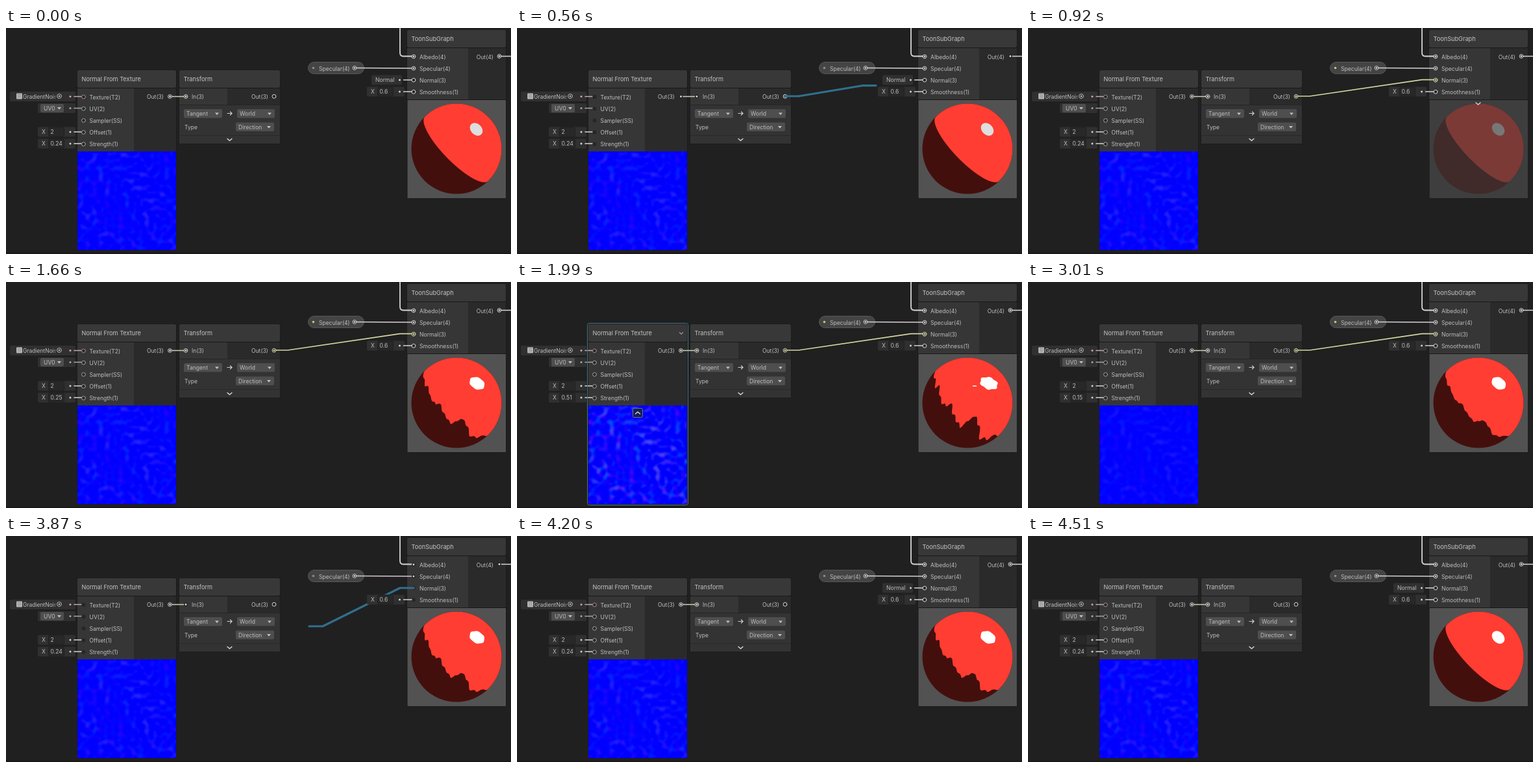
These frames come from a looping animation (778 by 348 pixels, 4610 ms). An HTML page with a canvas:

```html
<!DOCTYPE html>
<html lang="en">
<head>
<meta charset="utf-8">
<title>Shader graph</title>
<style>
html, body { margin: 0; width: 100%; height: 100%; overflow: hidden; background: #202020; }
canvas { display: block; }
</style>
</head>
<body>
<canvas id="stage" width="778" height="348"></canvas>
<script>
const ctx = document.getElementById('stage').getContext('2d');
const LOOP = 4610;
const WHITE = '#d6d5d6', YELLOW = '#d3d5a2', BLUE = '#326f8f', PINK = '#c4a9b4', DARK = '#262626';

const during = (t, from, to) => t >= from && t < to;
const mix = (a, b, k) => a + (b - a) * k;
const ease = k => k * k * (3 - 2 * k);

// Value at x on a list of [x, value] points
function sample(points, x, curve = k => k) {
  if (x <= points[0][0]) return points[0][1];
  for (let i = 1; i < points.length; i++) {
    const [x0, a] = points[i - 1], [x1, b] = points[i];
    if (x <= x1) return mix(a, b, curve((x - x0) / (x1 - x0)));
  }
  return points[points.length - 1][1];
}

// Strength scrubbed by the mouse, with short rests
const STRENGTH = [[1650, .24], [1990, .51], [2040, .54], [2170, .3], [2220, .05], [2270, -.12],
  [2499, -.12], [2500, -.18], [2680, -.08], [2829, -.08], [2830, 0], [3010, .15], [3220, .23],
  [3369, .23], [3370, .24]];

function rect(x, y, w, h, fill, r = 0, stroke) {
  ctx.beginPath();
  ctx.roundRect(x, y, w, h, r);
  if (fill) { ctx.fillStyle = fill; ctx.fill(); }
  if (stroke) { ctx.strokeStyle = stroke; ctx.lineWidth = 1; ctx.stroke(); }
}

function disc(x, y, r, fill) {
  ctx.beginPath();
  ctx.arc(x, y, r, 0, 7);
  ctx.fillStyle = fill;
  ctx.fill();
}

function ring(x, y, r, color) {
  ctx.beginPath();
  ctx.arc(x, y, r, 0, 7);
  ctx.strokeStyle = color;
  ctx.lineWidth = 1;
  ctx.stroke();
}

function line(points, color, width = 1.5) {
  ctx.beginPath();
  points.forEach(([x, y]) => ctx.lineTo(x, y));
  ctx.strokeStyle = color;
  ctx.lineWidth = width;
  ctx.lineJoin = ctx.lineCap = 'round';
  ctx.stroke();
}

function text(str, x, y, size = 8.6, color = '#bebebe', align = 'left') {
  ctx.font = `${size}px Inter, sans-serif`;
  ctx.textAlign = align;
  ctx.textBaseline = 'alphabetic';
  ctx.fillStyle = color;
  ctx.fillText(str, x, y);
}

function clipped(x, y, w, h, draw) {
  ctx.save();
  ctx.beginPath();
  ctx.rect(x, y, w, h);
  ctx.clip();
  draw();
  ctx.restore();
}

function port(x, y, color, filled, dim) {
  disc(x, y, 2.9, DARK);
  if (!dim) ring(x, y, 2.9, color);
  if (filled) disc(x, y, 1.4, color);
}

function chevron(x, y, color, up = 1, w = 3.5) {
  line([[x - w, y - w * .45 * up], [x, y + w * .45 * up], [x + w, y - w * .45 * up]], color, 1.3);
}

function caret(x, y) {
  ctx.beginPath();
  ctx.moveTo(x - 3, y - 1.5);
  ctx.lineTo(x + 3, y - 1.5);
  ctx.lineTo(x, y + 2);
  ctx.fillStyle = '#c4c4c4';
  ctx.fill();
}

function dropdown(label, x, y, w) {
  rect(x, y, w, 13.5, '#4e4e4e', 2);
  text(label, x + 4, y + 10);
  caret(x + w - 8, y + 7);
}

function node(title, x, y, w, h, split, bodyH) {
  rect(x - .5, y - .5, w + 1, h + 1, '#181818', 2);
  rect(x, y, w, 27, '#383838', 2);
  rect(x, y + 28, split - x, bodyH, '#363636');
  rect(split, y + 28, x + w - split, bodyH, '#2a2a2a');
  text(title, x + 6.5, y + 17, 9.2, '#c4c4c4');
}

const hover = (x, y, w, h) => rect(x - 1.5, y - 1.5, w + 3, h + 3, null, 3, '#44738a');

function wire(x0, y0, x1, y1, color, width) {
  const stub = Math.min(21, Math.abs(x1 - x0) / 2);
  line([[x0, y0], [x0 + stub, y0], [x1 - stub, y1], [x1, y1]], color, width);
}

function fieldBox(x, y, w, dotX, portX, color) {
  rect(x, y, w, 15, '#303030', 2);
  line([[dotX + 6, y + 7.5], [portX - 3, y + 7.5]], color);
  disc(dotX, y + 7.5, 1.5, color);
}

function numberField(x, y, value, dotX, portX) {
  fieldBox(x, y, 58, dotX, portX, WHITE);
  rect(x + 16.5, y + .5, 24, 14, '#282828', 2, '#202020');
  text('X', x + 6, y + 10.8);
  clipped(x + 17, y, 22.5, 15, () => text(value, x + 19.5, y + 10.8));
}

// Gradient noise, and the slopes a normal map takes from it
function gradient(x, y) {
  x %= 289; y %= 289;
  let h = ((34 * x + 1) * x) % 289 + y;
  h = ((34 * h + 1) * h) % 289;
  h = (h / 41 % 1) * 2 - 1;
  const gx = h - Math.floor(h + .5), gy = Math.abs(h) - .5, len = Math.hypot(gx, gy);
  return [gx / len, gy / len];
}

function noise(x, y) {
  const ix = Math.floor(x), iy = Math.floor(y), fx = x - ix, fy = y - iy;
  const corner = (cx, cy) => {
    const [gx, gy] = gradient(ix + cx, iy + cy);
    return gx * (fx - cx) + gy * (fy - cy);
  };
  const fade = k => k * k * k * (k * (k * 6 - 15) + 10);
  return mix(mix(corner(0, 0), corner(1, 0), fade(fx)), mix(corner(0, 1), corner(1, 1), fade(fx)), fade(fy));
}

const SIZE = 152, CELLS = 15, SHIFT = 12, GAIN = .65;
const slopes = [];
for (let j = 0; j < SIZE; j++) {
  for (let i = 0; i < SIZE; i++) {
    const x = i / SIZE * CELLS, y = (1 - j / SIZE) * CELLS, n = noise(x, y);
    slopes.push([n - noise((x + SHIFT) % CELLS, y), n - noise(x, (y + SHIFT) % CELLS)]);
  }
}
const normalMap = ctx.createImageData(SIZE, SIZE);
let drawnStrength = null;

function normalPreview(strength) {
  if (strength !== drawnStrength) {
    slopes.forEach(([dx, dy], i) => {
      const a = dx * strength * GAIN, b = dy * strength * GAIN, k = 255 / Math.hypot(a, b, 1);
      normalMap.data.set([Math.max(0, a * k), Math.max(0, b * k), k, 255], i * 4);
    });
    drawnStrength = strength;
  }
  ctx.putImageData(normalMap, 110, 190);
}

// Bumps along the shadow edge, in pixels at a strength of 0.24
const BUMPS = [[-70, 0], [-60, 1], [-54, 3], [-48, 0], [-35, 6], [-24, 6], [-18, 0], [-2, 6],
  [12, 9], [20, 2], [26, -8], [38, -4], [48, 6], [57, 5], [63, 0], [70, 0]];

function ball(bump, dim, shine) {
  const cx = 694, cy = 186, R = 69.5;
  rect(618.5, 111, 151.5, 151, dim ? '#3e3e3e' : '#525252');
  disc(cx, cy, R, dim ? '#402b2a' : '#430f0d');

  ctx.save();
  ctx.beginPath();
  ctx.arc(cx, cy, R, 0, 7);
  ctx.clip();
  ctx.translate(cx, cy);
  ctx.rotate(Math.atan2(.714, .7));
  ctx.beginPath();
  ctx.moveTo(-R, -R);
  const swell = 1.9 * Math.tanh(bump / .43);
  for (let u = -R; u <= R; u += .5) {
    const edge = 20 * Math.sqrt(1 - (u / R) ** 2);
    const off = sample(BUMPS, u, ease) * swell + 5 * bump * Math.sin(u * .55);
    ctx.lineTo(u + off * .4, edge + off);
  }
  ctx.lineTo(R, -R);
  ctx.fillStyle = dim ? '#7b3a36' : '#ff3d32';
  ctx.fill();
  ctx.restore();

  ctx.beginPath();
  for (let a = 0; a < 6.28; a += .1) {
    const k = 1 + .15 * bump * Math.cos(6 * a);
    const p = 11 * Math.cos(a) * k, q = 8.3 * Math.sin(a) * k;
    ctx.lineTo(724.5 + 5 * bump + (p - q) * .707 * (1 + .75 * bump), 156 + (p + q) * .707);
  }
  ctx.fillStyle = dim ? '#777' : shine;
  ctx.fill();
  if (bump > .4) rect(702, 159.5, 6, 1.5, shine);
  if (dim) chevron(693.5, 116.5, '#ddd');
}

function normalNode(t, strength, dragging) {
  node('Normal From Texture', 110, 65, 152, 277, 197, 97);

  fieldBox(6, 98, 101, 99, 119, PINK);
  rect(16, 100.5, 9, 9, '#b5b5b5', 1);
  for (const y of [103, 106]) line([[18, y], [23, y]], '#8a8a8a', 1);
  clipped(26, 98, 50, 15, () => text('GradientNoise', 26, 108.5, 8.5));
  ring(82, 105, 3.4, '#b8b8b8');
  disc(82, 105, 1.3, '#b8b8b8');

  fieldBox(49, 116, 58, 99, 119, '#a8a8a8');
  rect(53, 117, 36, 13, '#4e4e4e', 2);
  text('UV0', 58, 126.5);
  caret(82, 123.5);
  numberField(49, 152.5, '2', 99, 119);
  numberField(49, 170.5, strength.toFixed(2), 99, 119);

  ['Texture(T2)', 'UV(2)', 'Sampler(SS)', 'Offset(1)', 'Strength(1)'].forEach((label, i) => {
    const y = 106 + i * 18.2;
    port(119.5, y, i ? '#a6a6a6' : '#a58a93', false, dragging);
    text(label, 128.5, y + 3.5);
  });
  text('Out(3)', 243, 109, 8.6, '#bebebe', 'right');
  normalPreview(strength);

  if (during(t, 1850, 2170)) {
    hover(110, 65, 152, 277);
    chevron(253, 79, '#999', 1, 2.6);
    rect(178.5, 194.5, 15, 14, '#162052', 2, '#687294');
    chevron(186, 201.5, '#ddd', -1);
  }
}

function transformNode(t) {
  node('Transform', 267, 65, 155, 113, 341, 25);
  rect(267, 118.5, 155, 59.5, '#333');
  rect(267, 165, 155, 1, '#292929');
  text('In(3)', 286, 109);
  text('Out(3)', 404, 109, 8.6, '#bebebe', 'right');
  dropdown('Tangent', 274, 125, 59);
  dropdown('World', 356, 125, 58);
  line([[341, 131.5], [348, 131.5]], '#ccc', 1.2);
  line([[345.5, 129], [348, 131.5], [345.5, 134]], '#ccc', 1.2);
  text('Type', 275, 155.5);
  dropdown('Direction', 354, 145.5, 59);
  chevron(344.5, 172, '#ddd');
  if (during(t, 50, 480)) hover(267, 65, 155, 113);
}

function toonNode(t, strength, { connected, pulling, plugging }) {
  node('ToonSubGraph', 618, 3, 152, 259, 712, 79);

  rect(465.5, 52.5, 86, 18, '#444', 9, '#565656');
  disc(473.5, 61.5, 1.8, connected ? '#c8c864' : '#8c8c8c');
  text('Specular(4)', 482, 65.5);

  if (!connected && !pulling) {
    fieldBox(563, 72.5, 47, 606.5, 628, WHITE);
    text('Normal', 569, 83);
  }

  ctx.beginPath();
  ctx.moveTo(607, -2);
  ctx.lineTo(607, 38);
  ctx.quadraticCurveTo(607, 43.5, 612, 43.5);
  ctx.lineTo(628, 43.5);
  ctx.strokeStyle = WHITE;
  ctx.lineWidth = 1.8;
  ctx.stroke();
  line([[537, 61.5], [628, 62]], pulling ? '#d8c4d6' : '#d8d0d6', 1.7);
  line([[760, 43.5], [780, 43.5]], WHITE, 1.6);
  port(537, 61.5, WHITE, true);

  ['Albedo(4)', 'Specular(4)', 'Normal(3)', 'Smoothness(1)'].forEach((label, i) => {
    const y = 44 + i * 18.1;
    const normal = i === 2;
    const color = normal && pulling ? BLUE : normal && connected ? YELLOW : WHITE;
    port(628, y, color, i < 2 || normal && (connected || pulling), pulling);
    text(label, 637, y + 3.7);
  });
  port(760, 43.5, WHITE, true, pulling || plugging);
  text('Out(4)', 751, 47.5, 8.6, '#bebebe', 'right');

  const bumpy = during(t, 1100, 4510);
  ball(bumpy ? strength : 0, during(t, 920, 1100), t < 920 ? '#dedede' : '#fff');
}

function draw(t) {
  const strength = sample(STRENGTH, t);
  const state = {
    plugging: during(t, 330, 920),
    connected: during(t, 920, 3730),
    pulling: during(t, 3730, 4200)
  };
  const { plugging, connected, pulling } = state;

  rect(0, 0, 778, 348, '#202020');
  rect(0, 346, 778, 2, '#191919');
  normalNode(t, strength, plugging || pulling);
  transformNode(t);
  toonNode(t, strength, state);

  line([[252.5, 105.5], [277, 105.5]], '#cdcfb8');
  port(252.5, 105.5, WHITE, true, plugging);
  port(277, 105.5, WHITE, true, plugging || pulling);

  if (connected) wire(413, 105, 628, 79.7, YELLOW, 1.7);
  port(413, 105.3, connected ? YELLOW : WHITE, connected || plugging);
  if (connected) port(628, 80.2, YELLOW, true);

  if (plugging) {
    const k = ease(Math.min(1, (t - 290) / 450));
    wire(413, 105, mix(413, 628, k), mix(105, 80, k), BLUE, 3.2);
  }
  if (pulling) {
    const k = ease(Math.min(1, (t - 3690) / 180));
    wire(mix(413, 467, k), mix(105, 139, k), 628, 80, BLUE, 3.2);
  }
  numberField(556, 90.5, '0.6', 606.5, 628);
}

function tick() {
  draw(performance.now() % LOOP);
  requestAnimationFrame(tick);
}
tick();
</script>
</body>
</html>
```
